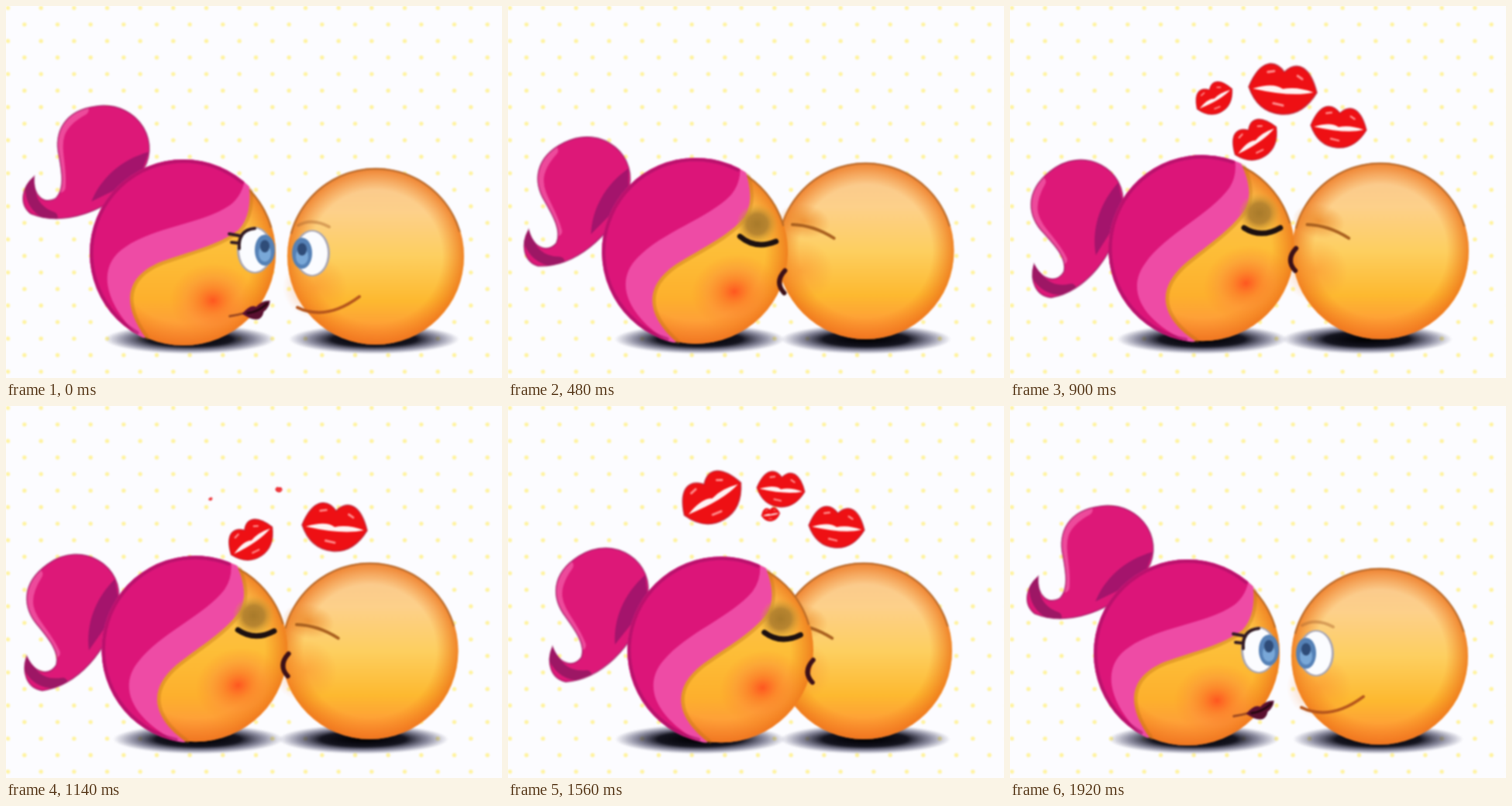
Animation of 640 by 480 pixels, one loop 2.04 s. Source, as an HTML page with a canvas:

```html
<!DOCTYPE html>
<html lang="en">
<head>
<meta charset="utf-8">
<title>Kissing smileys</title>
<style>
html, body { margin: 0; width: 100%; height: 100%; overflow: hidden; background: #fcfcff; }
canvas { display: block; filter: blur(.9px); }
</style>
</head>
<body>
<canvas width="640" height="480"></canvas>
<script>
const ctx = document.querySelector('canvas').getContext('2d');
const STEP = 60, LOOP = 2040, LAST = 32, RAD = Math.PI / 180;

// step, girl x, girl lean in degrees, boy x
const poses = [
  [0, 229, 0, 477], [4, 235, 5, 474], [9, 243, 13, 460], [11, 246, 16, 453], [15, 248, 20, 478],
  [22, 242, 17, 464], [26, 275, 16, 459], [28, 268, 12, 500], [30, 244, 4, 490], [32, 229, 0, 477]
];

// x, y, turn, then [step, width] pairs
const kisses = [
  [317, 174, -34, [9, 0], [11, 92], [15, 64], [22, 64], [25, 0]],
  [352, 108, 5, [10, 0], [11, 22], [15, 88], [20, 0], [22, 20], [26, 62], [32, 0]],
  [424, 157, 5, [9, 0], [11, 64], [15, 72], [22, 92], [26, 72], [31, 0]],
  [264, 120, -30, [11, 0], [15, 52], [20, 0], [22, 42], [26, 84], [31, 0]],
  [339, 140, -8, [19, 0], [22, 70], [26, 24], [28, 0]]
];

const clamp = v => Math.max(0, Math.min(1, v));

function sample(rows, k) {
  const i = rows.findIndex(r => r[0] >= k);
  if (i < 1) return rows.at(i);
  const a = rows[i - 1], b = rows[i];
  const u = (k - a[0]) / (b[0] - a[0]), e = u * u * (3 - 2 * u);
  return a.map((v, j) => v + (b[j] - v) * e);
}

function at(x, y, deg, draw) {
  ctx.save();
  ctx.translate(x, y);
  ctx.rotate(deg * RAD);
  draw();
  ctx.restore();
}

function fade(alpha, draw) {
  ctx.globalAlpha = alpha;
  if (alpha > 0) draw();
  ctx.globalAlpha = 1;
}

function fill(d, color) {
  ctx.fillStyle = color;
  ctx.fill(new Path2D(d));
}

function line(d, color, width) {
  ctx.strokeStyle = color;
  ctx.lineWidth = width;
  ctx.lineCap = 'round';
  ctx.stroke(new Path2D(d));
}

function oval(x, y, rx, ry, color) {
  ctx.beginPath();
  ctx.ellipse(x, y, rx, ry, 0, 0, 7);
  ctx.fillStyle = color;
  ctx.fill();
}

// colours are spread evenly along the gradient
function shade(gradient, colors) {
  colors.forEach((c, i) => gradient.addColorStop(i / (colors.length - 1), c));
  return gradient;
}

function glow(x, y, rx, ry, ...colors) {
  ctx.save();
  ctx.translate(x, y);
  ctx.scale(rx, ry);
  oval(0, 0, 1, 1, shade(ctx.createRadialGradient(0, 0, 0, 0, 0, 1), colors));
  ctx.restore();
}

const shadow = x => glow(x, 430, 110, 19, '#000', '#08080f', '#14141f', '#3c3c5a99', '#3c3c6400');

function ball(r, ...colors) {
  oval(0, 0, r, r, shade(ctx.createLinearGradient(0, -r, 0, r), colors));
  glow(0, 0, r, r, '#f0781400', '#f0781400', '#f0781400', '#f0781400', '#ec7018cc');
  ctx.beginPath();
  ctx.arc(0, 0, r - 1, 3.4, 6);
  ctx.strokeStyle = '#965a288c';
  ctx.lineWidth = 2.5;
  ctx.stroke();
}

function eye(x, irisX, open) {
  at(x, -4, 0, () => {
    ctx.scale(1, open);
    oval(0, 0, 23, 30, '#a8a6b4');
    oval(0, 0, 20, 28, '#fbfcff');
    oval(irisX, 0, 13, 20, '#5581b6');
    oval(irisX, 4, 8, 11, '#79a8d8');
    oval(irisX, -5, 6, 8, '#2f4c78');
  });
}

function boy(x, y, turn, lid) {
  at(x, y, 0, () => ball(114, '#f9c68e', '#fdd08a', '#fdcf60', '#fdb930', '#ff8d3b'));
  at(x, y, turn, () => {
    glow(-78, 40, 42, 40, '#fa872d80', '#fa872d00');
    fade(1 - lid, () => {
      line('M-100 -40Q-82 -50 -60 -38', '#b46e3280', 4);
      eye(-82, -13, 1);
      line('M-101 66Q-64 84 -21 52', '#b5561c', 4);
    });
    fade(lid, () => {
      glow(-85, -24, 34, 22, '#ec8728cc', '#ec872800');
      line('M-99 -17Q-72 -21 -43 -9', '#a9601f', 4);
    });
  });
}

function ponytail() {
  line('M-3 2L5 10', '#f6b94a', 12);
  const tail = new Path2D('M0 6C32 -32 0 -90 -55 -83C-98 -78 -110 -48 -104 -20C-100 2 -96 24 -108 36C-122 44 -138 34 -136 8C-152 22 -156 44 -140 56C-100 72 -40 56 0 6Z');
  ctx.fillStyle = '#dd1878';
  ctx.fill(tail);
  ctx.save();
  ctx.clip(tail);
  line('M-72 -78C-124 -50 -98 -20 -102 22', '#ed4a9b', 13);
  fill('M12 -24C-24 -14 -50 10 -62 40L0 10Z', '#a4146c');
  line('M-140 10Q-146 48 -112 60', '#9d1765', 13);
  ctx.restore();
  ctx.strokeStyle = '#96105c8c';
  ctx.lineWidth = 2;
  ctx.stroke(tail);
}

function girlEye(lid) {
  fade(lid, () => glow(85, -18, 27, 26, '#a87a2a', '#b88530', '#dca03200'));
  if (lid < 1) eye(92, 13, 1 - lid);
  if (lid > .4) {
    line('M60 -7Q76 14 104 9', '#1c1010', 7);
  } else {
    line('M72 -6Q70 -30 92 -32M75 -22L59 -25M72 -13L62 -14', '#321a22', 4);
  }
}

function girlMouth(angle, lid) {
  at(118 * Math.cos(angle * RAD), 118 * Math.sin(angle * RAD), 0, () => {
    if (lid === 1) return line('M4 -15Q-10 0 3 14', '#3c1018', 6);
    ctx.rotate(-38 * lid * RAD);
    line('M-32 7Q-12 4 0 -2', '#9c4820', 3);
    fill('M-16 4Q-5 -9 2 -5Q10 -14 20 -13Q19 -4 12 1Q8 20 -16 4Z', '#5a1030');
    line('M-9 3Q4 2 16 -9', '#24060f', 3);
  });
}

function hair(edge, color) {
  fill(edge + 'L83 -130L-130 -130L-130 109Z', color);
}

function girl(x, y, lean, lid) {
  at(x, y, 0, () => ball(119, '#fcbc5a', '#fdc04a', '#fdbe38', '#fdb02d', '#ff9142'));
  at(x, y, -lean, () => {
    ctx.save();
    ctx.beginPath();
    ctx.arc(0, 0, 121, 0, 7);
    ctx.clip();
    glow(38, 61, 56, 48, '#ff501ef0', '#fc6e28a0', '#fc823c50', '#fc822800');
    const fringe = 'M-49 109C-80 66 -76 30 -29 11C10 -3 44 -10 71 -30C86 -46 87 -68 84 -95';
    line(fringe, '#be6e1460', 9);
    hair(fringe, '#ee4ba5');
    hair('M-58 107C-104 62 -112 16 -75 -8C-38 -34 25 -38 60 -62Q76 -74 80 -98', '#dc1579');
    ctx.beginPath();
    ctx.arc(0, 0, 119, 2.1, 5.4);
    ctx.strokeStyle = '#a010648c';
    ctx.lineWidth = 5;
    ctx.stroke();
    ctx.restore();
    girlEye(lid);
  });
  at(x, y, 0, () => girlMouth(39 - 1.6 * lean, lid));
}

function lips(x, y, turn, width) {
  if (width < 2) return;
  at(x, y, turn, () => {
    ctx.scale(width / 100, width / 100);
    const shape = 'M-50 0C-36 -44 -14 -42 0 -26C18 -46 38 -36 50 0Q32 36 0 36Q-34 36 -50 0Z';
    fill(shape, '#ee1014');
    line(shape, '#b4142899', 2.5);
    fill('M-44 2Q-14 -10 0 -1Q20 -7 45 0Q14 10 -44 2Z', '#fff4f4');
    line('M-24 -24L-15 -26M20 -22L27 -18M-12 21L2 23', '#ff8c8c', 3.5);
  });
}

function background() {
  ctx.fillStyle = '#fcfcff';
  ctx.fillRect(0, 0, 640, 480);
  const gap = 64 / 3;
  for (let row = 0; row < 23; row++)
    for (let col = row % 2; col < 31; col += 2)
      oval(2.5 + col * gap, 2.5 + row * gap, 2.7, 2.7, '#fff3a0');
}

function draw(now) {
  const k = Math.min(LAST, Math.floor(now % LOOP / STEP));
  const [, girlX, lean, boyX] = sample(poses, k);
  const girlY = 319 - lean * lean / 70, near = clamp(lean / 13);
  const boyTurn = Math.min(10, 1.6 * lean);
  const tailAngle = (242 - 1.65 * lean) * RAD;
  background();
  shadow(237 + 11 * near);
  shadow(475 - 14 * near);
  boy(boyX, 323 - .7 * boyTurn, boyTurn, clamp((lean - 5) / 6));
  at(girlX + 121 * Math.cos(tailAngle), girlY + 121 * Math.sin(tailAngle), -1.6 * lean, ponytail);
  girl(girlX, girlY, lean, clamp(lean / 7.5));
  const rise = Math.max(0, k - 27) * 20;
  for (const [x, y, turn, ...sizes] of kisses) lips(x, y - rise, turn, k < sizes[0][0] ? 0 : sample(sizes, k)[1]);
}

const start = performance.now();
function tick() {
  draw(performance.now() - start);
  requestAnimationFrame(tick);
}
tick();
</script>
</body>
</html>
```
